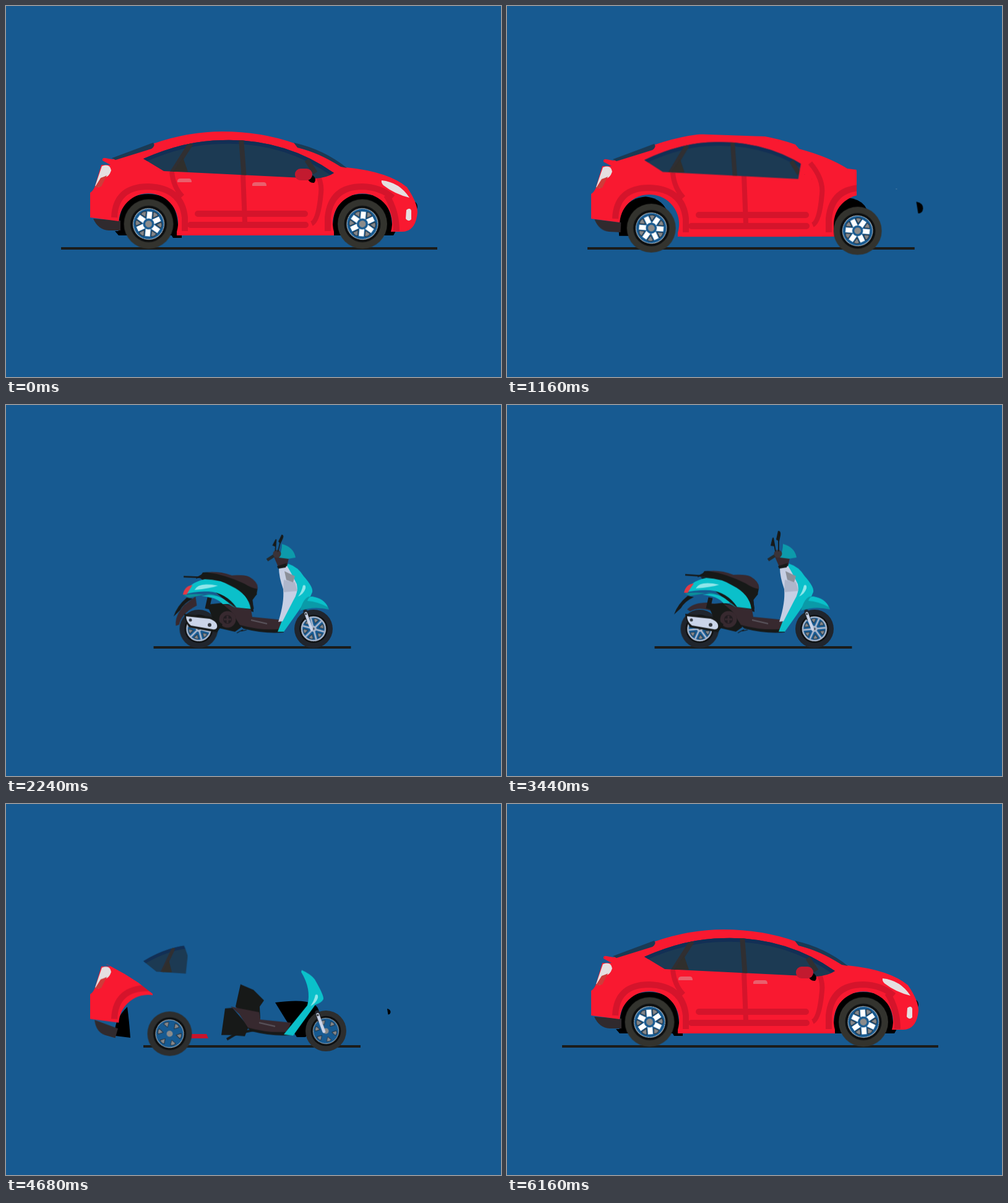
An HTML page without scripts for the animation above (6200 ms loop, 800 by 600 pixels).

```html
<!DOCTYPE html>
<html lang="en">
<head>
<meta charset="utf-8">
<title>Car and scooter</title>
<style>
html, body { margin: 0; width: 100%; height: 100%; overflow: hidden; background: #175a91; }
svg { position: absolute; left: 0; top: 0; width: 800px; height: 600px; }

/* One pass runs car to scooter in 3.1s, then plays backwards. */
.a { animation: 3.1s linear infinite alternate both; }
.bob { animation: bob .62s ease-in-out infinite alternate; }
.spin { animation: spin 1.55s linear infinite; }
@keyframes bob { to { transform: translateY(-1px); } }
@keyframes spin { from { transform: rotate(-25deg); } to { transform: rotate(335deg); } }

.ground { animation-name: ground; }
@keyframes ground {
  0%, 32.3% { d: path("M89 392L697 392"); }
  49% { d: path("M222 392L573 392"); }
  51.6%, 100% { d: path("M238.500 392L557.500 392"); }
}

/* car */
.shell { animation-name: wipe; }
@keyframes wipe {
  0%, 32% { clip-path: polygon(100px 180px, 300px 180px, 500px 180px, 720px 180px, 720px 250px, 720px 300px, 720px 400px, 100px 400px); transform: none; }
  49% { clip-path: polygon(100px 256px, 163px 253px, 192px 269px, 214px 283px, 237px 301px, 237px 325px, 188px 400px, 100px 400px); transform: translateY(6px); }
  51.6% { clip-path: polygon(100px 270px, 156px 270px, 165px 284px, 152px 300px, 178px 322px, 186px 345px, 186px 400px, 100px 400px); transform: none; }
  55%, 100% { clip-path: polygon(100px 345px, 130px 345px, 132px 345px, 133px 345px, 134px 345px, 135px 350px, 135px 400px, 100px 400px); transform: none; }
}
.glass { animation-name: pane; transform-origin: 222px 247px; }
@keyframes pane {
  0%, 33% { clip-path: polygon(200px 200px, 560px 200px, 570px 230px, 570px 250px, 560px 300px, 200px 300px); transform: none; }
  49% { clip-path: polygon(200px 200px, 314px 200px, 328px 224px, 334px 237px, 325px 300px, 200px 300px); transform: translateY(7px) scale(.64, .86); }
  51.6% { clip-path: polygon(200px 200px, 243px 230px, 250px 245px, 254px 254px, 262px 272px, 200px 300px); transform: translateY(1px) scale(.7, .9); }
  54%, 100% { clip-path: polygon(200px 200px, 215px 230px, 217px 240px, 218px 248px, 220px 272px, 200px 300px); transform: none; }
}
.wellr { animation-name: wellr; }
@keyframes wellr {
  0%, 35% { d: path("M182 371Q178 304 230 304Q282 304 278 371Z"); }
  49% { d: path("M177 375Q172 352 196 328Q199 350 201 378Z"); }
  51.6% { d: path("M174 360Q176 358 178 360Q182 368 184 373Z"); }
  54%, 100% { d: path("M174 362Q174 362 174 362Q174 362 174 362Z"); }
}
.wellf { animation-name: wellf; }
@keyframes wellf {
  0%, 32% { d: path("M528 371Q524 304 576 304Q628 304 624 371Z"); }
  49% { d: path("M470 377Q452 349 435 321Q545 306 484 377Z"); }
  51.6% { d: path("M468 374Q452 352 434 317Q490 308 470 374Z"); }
  56%, 100% { d: path("M452 366Q452 366 452 366Q452 366 452 366Z"); }
}
.sill { animation-name: sill; }
@keyframes sill {
  0%, 33% { d: path("M280 362L528 362L528 371L280 371Z"); fill: #f91930; }
  49% { d: path("M290 372L324 372L327 379L290 379Z"); fill: #c8142c; }
  51.6%, 100% { d: path("M290 372L290 372L290 379L290 379Z"); fill: #c8142c; }
}
.chin { animation-name: chin; transform-origin: 141px 348px; }
@keyframes chin {
  0%, 35% { transform: none; }
  49% { transform: translate(1px, 5px) rotate(16deg) scaleX(.92); }
  51.6% { transform: translateY(1px) scaleX(.85); }
  55%, 100% { transform: scale(0); }
}
.nose { animation-name: nose; transform-origin: 662px 322px; }
@keyframes nose {
  0%, 30% { transform: none; }
  42% { transform: translate(12px, 4px); }
  49% { transform: translate(-42px, 13px) scale(.5); }
  51%, 100% { transform: translate(-60px, 16px) scale(0); }
}
.slip { animation-name: slip; transform-box: fill-box; transform-origin: center; }
@keyframes slip {
  0%, 20.6% { transform: none; }
  21.9% { transform: translateX(7px); }
  27% { transform: translateX(10px); }
  36%, 100% { transform: translateX(-8px) scale(0); }
}
.fade { animation-name: fade; transform-box: fill-box; transform-origin: center; }
@keyframes fade { 0%, 24% { transform: none; } 38%, 100% { transform: scale(0); } }
.screen { animation-name: screen; transform-origin: 466px 222px; }
@keyframes screen {
  0%, 20.6% { transform: none; }
  21.9% { transform: rotate(-8.300deg); }
  26% { transform: rotate(-14deg) scale(.8); }
  34%, 100% { transform: rotate(-18deg) scale(0); }
}

/* wheels */
.rear { animation-name: rear; }
@keyframes rear {
  0%, 35% { transform: translate(230.500px, 352.500px); }
  41% { transform: translate(237px, 369px) scale(.97); }
  49% { transform: translate(264.500px, 371.500px) scale(.9); }
  51.6% { transform: translate(304px, 365px) scale(.8); }
  55%, 100% { transform: translate(311.500px, 362px) scale(.775); }
}
.front { animation-name: front; }
@keyframes front {
  0%, 32.3% { transform: translate(576px, 352.500px); }
  40% { transform: translate(562px, 369px) scale(.96); }
  49% { transform: translate(517px, 367px) scale(.825); }
  51.6% { transform: translate(500px, 362px) scale(.78); }
  54%, 100% { transform: translate(497px, 362px) scale(.775); }
}
.tyre { animation-name: tyre; }
@keyframes tyre { 0%, 47% { fill: #33332e; } 53%, 100% { fill: #20252d; } }
.white { animation-name: hide; }
.rim { animation-name: show; }
.fork { animation-name: fork; }
@keyframes hide { 0%, 39% { opacity: 1; } 46%, 100% { opacity: 0; } }
@keyframes show { 0%, 49% { opacity: 0; } 52%, 100% { opacity: 1; } }
@keyframes fork { 0%, 41% { opacity: 0; } 48%, 100% { opacity: 1; } }

/* scooter */
.core { animation-name: core; transform-origin: 470px 350px; }
@keyframes core { 0%, 41% { transform: scale(0); } 48%, 100% { transform: none; } }
.shield { animation-name: shield; }
@keyframes shield {
  0%, 49% { d: path("M478 269Q492 275 499 284Q514 310 513 316Q510 322 500 325L464 375L449 373L487 326Q494 300 477 272Z"); }
  51.6% { d: path("M470 263Q484 262 492 277Q508 300 507 307Q505 318 494 322L460 373L445 371L480 322Q487 295 468 267Z"); }
  60%, 100% { d: path("M456 257Q472 262 481 277Q497 295 495 303Q490 317 480 323L449 367L439 367L458 318Q466 290 452 264Z"); }
}
.base { animation-name: base; }
@keyframes base {
  0%, 49% { d: path("M379 292L400 301L417 318L410 328L411 348L385 345L371 328Z"); }
  51.6% { d: path("M351 283L385 296L412 316L402 328L406 346L375 340L345 318Z"); }
  63%, 100% { d: path("M313 279L350 279L406 306L398 312L400 335L366 326L335 300Z"); }
}
.engine { animation-name: engine; }
@keyframes engine {
  0%, 49% { d: path("M354 331L366 330L392 360L386 376L362 374L348 374Z"); }
  51.6% { d: path("M340 327L365 322L390 350L378 368L346 369L337 340Z"); }
  62%, 100% { d: path("M325 323L352 320L374 328L380 360L370 367L340 360Z"); }
}
.floor { animation-name: drift; }
.shine { animation-name: drift2; }
@keyframes drift { 0%, 49% { transform: translate(13px, 6px); } 51.6% { transform: translate(8px, 4px); } 60%, 100% { transform: none; } }
@keyframes drift2 { 0%, 49% { transform: translate(20px, 17px); } 51.6% { transform: translate(14px, 11px); } 60%, 100% { transform: none; } }
.stand { animation-name: stand; transform-origin: 380px 364px; }
@keyframes stand { 0%, 52% { transform: none; } 62%, 100% { transform: scale(.3); } }

.in1 { animation-name: in1; }
.in2 { animation-name: in2; }
.in3 { animation-name: in3; }
@keyframes in1 { 0%, 50% { transform: scale(0); } 58%, 100% { transform: none; } }
@keyframes in2 { 0%, 52% { transform: scale(0); } 65%, 100% { transform: none; } }
@keyframes in3 { 0%, 60% { transform: scale(0); } 70%, 100% { transform: none; } }
.settle { animation-name: settle; transform-origin: 400px 310px; }
@keyframes settle { 0%, 72.3% { transform: rotate(-1.500deg); } 81%, 100% { transform: none; } }
.mirror { animation-name: mirror; transform-origin: 438px 240px; }
@keyframes mirror {
  0%, 62% { transform: rotate(45deg) scale(0); }
  72.3% { transform: rotate(14deg) scale(.86); }
  81%, 100% { transform: none; }
}
.guard { animation-name: guard; transform-origin: 311px 362px; }
@keyframes guard {
  0%, 61% { transform: rotate(-150deg) scale(0); }
  64.5% { transform: rotate(-120deg) scale(.95); }
  72.3% { transform: rotate(-50deg); }
  81%, 100% { transform: none; }
}
</style>
</head>
<body>

<svg viewBox="0 0 800 600">
  <path class="a ground" d="M89 392L697 392" stroke="#1b1c1b" stroke-width="4"/>
  <path class="a fade" d="M176 364h16v7h-10zM264 365h20v10h-14zM528 364h14v7h-14zM610 364h20l-4 7h-16z"/>
  <path class="a wellr" d="M182 371Q178 304 230 304Q282 304 278 371Z"/>
  <path class="a wellf" d="M528 371Q524 304 576 304Q628 304 624 371Z"/>
  <path class="a nose" d="M654 314Q665 316 665 325Q664 333 657 333Z"/>
  <path class="a sill" d="M280 362L528 362L528 371L280 371Z"/>
  <path class="a chin" fill="#302a2e" d="M141 344L185 347V363H166Q149 362 141 344Z"/>
</svg>

<svg class="a shell" viewBox="0 0 800 600">
  <g class="bob">
    <path fill="#f91930" d="M136 342V302Q141 299 144 291L154 257H169L156 250Q155 245 161 246L172 248L240 222Q295 203 350 203Q412 203 466 222L472 229Q520 242 550 261Q618 268 648 293Q665 318 665 334Q662 365 640 365H622A48 48 0 1 0 530 365V371H276V365A48 48 0 1 0 182.200 348Z"/>
    <g fill="none" stroke="#d5142b" stroke-width="10">
      <path d="M175 342Q177 292 230 292Q284 294 289 342V364M520 364V342Q525 292 576 292Q606 293 625 310M615 306Q631 332 631 364"/>
      <path stroke-width="8" d="M268 268Q270 292 285 308M383 272L386 350M490 252Q512 278 509 303Q505 347 494 352"/>
      <path stroke-linecap="round" d="M310 336H483M298 354H484"/>
    </g>
    <path fill="#e5dfe0" d="M155 259Q168 254 170 266Q166 278 158 277L150 293L144 291Z"/>
    <path fill="#cf3b39" d="M153 278Q159 276 163 274L154 292L143 294Z"/>
    <path fill="#1b3a54" d="M171 246L238 221Q242 226 235 231L177 249Z"/>
  </g>
</svg>

<svg class="a glass" viewBox="0 0 800 600">
  <clipPath id="win"><path d="M222 247Q290 217 350 217Q450 214 530 270Q518 278 500 279L255 267Z"/></clipPath>
  <g clip-path="url(#win)">
    <path fill="#1c3a53" d="M200 200H560V300H200Z"/>
    <path fill="none" stroke="#122f55" stroke-width="12" d="M222 247Q290 217 350 217Q450 214 530 270"/>
    <path fill="none" stroke="#302f32" stroke-width="8" d="M299 222L267 272M380 214L385 280M486 249L500 270"/>
    <path fill="#302f2c" d="M286 245L294 268H270Z"/>
  </g>
</svg>

<svg viewBox="0 0 800 600">
  <defs>
    <g id="spokes">
      <path id="pair" d="M0-20V20"/>
      <use href="#pair" transform="rotate(60)"/>
      <use href="#pair" transform="rotate(120)"/>
    </g>
    <g id="hub">
      <circle r="25" fill="#175a91" stroke="#c9d2da"/>
      <g id="gaps" fill="#85878a" stroke="#1d2a36">
        <path id="gap" d="M-5-20Q0-23 5-20L0-12ZM-5 20Q0 23 5 20L0 12Z"/>
        <use href="#gap" transform="rotate(60)"/>
        <use href="#gap" transform="rotate(120)"/>
      </g>
      <circle r="5.500" fill="#8b8b8b"/>
    </g>
    <g id="white">
      <use href="#spokes" stroke="#fff" stroke-width="8" transform="rotate(30)"/>
      <circle r="9" fill="#175a91"/>
      <circle r="5.500" fill="#8b8b8b"/>
    </g>
    <g id="rim">
      <circle r="24.500" fill="none" stroke="#aab8ce" stroke-width="3"/>
      <use href="#spokes" stroke="#aab8ce" stroke-width="3" transform="rotate(30) scale(1.150)"/>
      <circle r="6" fill="#aab8ce"/>
      <circle r="2.500" fill="#555d68"/>
    </g>
  </defs>

  <!-- car trim -->
  <g class="bob">
    <path class="a screen" fill="#1b3a54" d="M465 221Q514 232 551 262L541 260Q505 237 471 229Z"/>
    <g fill="#e9606d">
      <path class="a slip" d="M277 285V282Q278 279 282 279H296Q300 279 300 285Z"/>
      <path class="a slip" d="M398 291V288Q399 285 403 285H417Q421 285 421 291Z"/>
    </g>
    <path class="a fade" d="M486 277L496 274Q503 280 498 286Q490 287 486 277Z"/>
    <rect class="a fade" x="467" y="263" width="28" height="19" rx="9" fill="#c21a2f"/>
    <path class="a fade" fill="#e5dfe0" d="M607 282Q636 285 652 310Q628 304 610 290Q606 286 607 282Z"/>
    <path class="a slip" fill="#e5dfe0" d="M647 330Q653 325 655 331V345Q650 350 646 344Z"/>
  </g>

  <g class="a rear">
    <circle class="a tyre" r="40"/>
    <circle r="29.500" fill="#0d0f10"/>
    <g class="spin">
      <use href="#hub"/>
      <g class="a white"><use href="#white"/></g>
      <g class="a rim"><use href="#rim"/></g>
    </g>
  </g>
  <g class="a front">
    <circle class="a tyre" r="40"/>
    <circle r="29.500" fill="#0d0f10"/>
    <g class="spin">
      <use href="#hub"/>
      <g class="a white"><use href="#white"/></g>
      <g class="a rim"><use href="#rim"/></g>
    </g>
    <g class="a fork" stroke-linecap="round">
      <path stroke="#20252d" stroke-width="9" d="M-17-36L-13-22"/>
      <path stroke="#c9d3e8" stroke-width="6" d="M-16-32L-4 1"/>
      <circle cx="-16" cy="-31" r="2" fill="#333"/>
    </g>
  </g>

  <!-- scooter -->
  <g class="bob">
    <path class="a guard" fill="#37292f" d="M291 331Q302 319 326 320L348 325L338 336Q312 325 296 334Z"/>

    <g class="a core">
      <path class="a stand" fill="none" stroke="#171918" stroke-width="4" d="M357 381L367 375L390 362M380 370L410 364"/>
      <path class="a engine" fill="#171918" d="M325 323L352 320L374 328L380 360L370 367L340 360Z"/>
      <path class="a base" fill="#171918" d="M313 279L350 279L406 306L398 312L400 335L366 326L335 300Z"/>
      <g class="a floor">
        <path fill="#171918" d="M374 354L446 350L449 368Q420 371 384 362Z"/>
        <path fill="#37292f" d="M350 322L396 331L398 343L448 348L440 363Q410 365 378 356L364 334Z"/>
        <path fill="none" stroke="#5d5860" stroke-width="2" d="M396 348L422 354"/>
      </g>
      <path class="a shield" fill="#0bc0ca" d="M456 257Q472 262 481 277Q497 295 495 303Q490 317 480 323L449 367L439 367L458 318Q466 290 452 264Z"/>
      <path class="a shine" fill="#8ee6ea" d="M480 292Q485 290 484 297Q481 306 472 310Q478 302 480 292Z"/>
    </g>

    <g class="a in1" style="transform-origin:497px 325px">
      <path fill="#0a9aa8" d="M475 333Q481 311 491 310Q516 312 522 331Q498 325 475 333Z"/>
      <path fill="#0bc0ca" d="M487 317Q490 309 495 310Q514 313 520 327Q503 318 487 317Z"/>
    </g>
    <g class="a in2" style="transform-origin:445px 350px">
      <path fill="#c6cfe4" d="M441 264L454 260Q463 275 470 290Q473 303 464 317L447 350L440 351Q450 320 448 298Q441 278 441 264Z"/>
      <path fill="#aeb6cb" d="M449 283L467 287L471 301L448 303Z"/>
      <path fill="#8c9099" d="M450 269L467 277L464 287L453 283Z"/>
    </g>

    <g class="a settle">
      <g class="a in2" style="transform-origin:406px 302px">
        <path fill="#171918" d="M313 278L319 269Q348 267 388 288L407 297L405 307L398 316L400 330L392 330Q385 306 364 292Q345 281 313 278Z"/>
        <path fill="#37292f" d="M326 269Q345 267 366 275Q386 274 394 278Q409 287 407 298Q396 296 386 289Q354 273 326 269Z"/>
      </g>
      <g class="a in2" style="transform-origin:404px 328px">
        <path fill="#0a8f9a" d="M287 305Q340 298 371 328L362 323Q346 305 326 304L296 309Z"/>
        <path fill="#0bc0ca" d="M288 304Q296 285 322 280Q347 281 364 292Q392 306 395 330L372 327Q356 303 328 300Q306 299 288 304Z"/>
        <path fill="#0bc0ca" d="M316 307Q344 302 361 321L350 321Q340 309 316 307Z"/>
        <path fill="#8ee6ea" d="M305 297Q312 284 343 291Q330 295 305 297Z"/>
        <path fill="#e23a46" d="M286 304Q289 290 302 289Q296 297 292 304Z"/>
      </g>
      <path class="a in3" style="transform-origin:318px 277px" fill="none" stroke="#171918" stroke-width="2.500" d="M288 275L318 277M308 278L318 273"/>
      <path class="a in3" style="transform-origin:300px 310px" fill="#171918" d="M270 339Q276 322 292 309L302 311Q287 318 281 329Z"/>
    </g>

    <g class="a in2" style="transform-origin:358px 347px">
      <path stroke="#171918" stroke-width="7" d="M329 312L325 330"/>
      <circle cx="358" cy="347" r="13.500" fill="#37292f"/>
      <circle cx="358" cy="347" r="7" fill="#211c20"/>
      <path stroke="#37292f" stroke-width="3" d="M352 347H364M358 341V353"/>
      <path fill="#171918" d="M288 338L334 343L350 355L341 368L296 360Q289 350 288 338Z"/>
      <path fill="#cbd5e9" d="M291 342L329 346Q343 351 341 360Q339 364 334 363L299 357Q291 351 291 342Z"/>
      <g fill="#343941"><circle cx="298" cy="348" r="2.500"/><circle cx="329" cy="356" r="3"/></g>
    </g>

    <g class="a in3" style="transform-origin:448px 262px">
      <path fill="#37292f" d="M433 246L457 248L454 261L440 262Z"/>
      <path fill="#171918" d="M438 261L454 256L452 263L440 265Z"/>
      <path fill="#0d9aab" d="M446 225Q465 230 468 247L456 249L441 247Q446 236 446 225Z"/>
      <path stroke="#25292b" stroke-width="5" d="M422 251L433 244"/>
      <circle cx="438" cy="241" r="6.500" fill="#3a3338"/>
    </g>
    <g class="a mirror" fill="#171918">
      <path stroke="#171918" stroke-width="1.800" d="M434 237L430 215M439 237V212"/>
      <path d="M429 215L433 229L426 228Z"/>
      <path d="M438 204Q443 203 442 211L440 221L435 218Z"/>
    </g>
  </g>
</svg>
</body>
</html>
```
